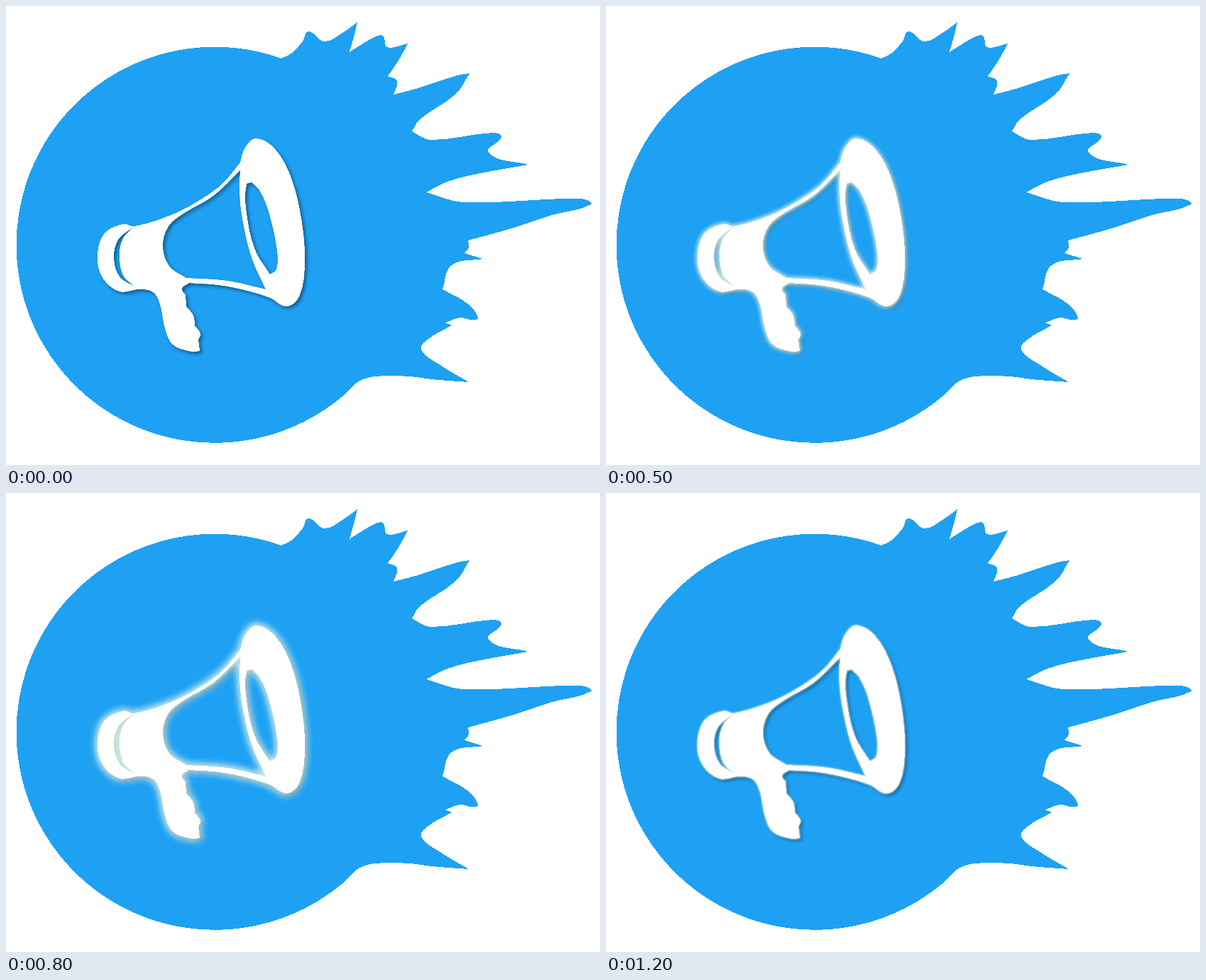
Recreate the animation shown at these times as an HTML page. Size 837 px wide and 648 px high, loop 1300 ms.

```html
<!DOCTYPE html>
<html lang="en">
<head>
<meta charset="utf-8">
<title>Megaphone</title>
<style>
  html, body { margin: 0; width: 100%; height: 100%; overflow: hidden; background: #fff; }
  svg { display: block; width: 837px; height: 648px; }
  .splat { fill: #1ea1f3; shape-rendering: crispEdges; }
  .horn { fill: #fff; shape-rendering: crispEdges; }
  .shadow { fill: #000; opacity: .42; filter: blur(2.5px); }
  .glow {
    fill: #ffffe8; stroke: #ffffe8; stroke-linejoin: round; opacity: .76;
    animation: glow 1300ms infinite;
  }
  /* Rises in eight even steps, then falls faster towards the end. */
  @keyframes glow {
    0%     { stroke-width: 0;   filter: blur(0);   animation-timing-function: steps(8); }
    61.53% { stroke-width: 8px; filter: blur(4px); animation-timing-function: steps(2); }
    76.92% { stroke-width: 6px; filter: blur(3px); animation-timing-function: steps(2); }
    92.3%  { stroke-width: 2px; filter: blur(1px); animation-timing-function: step-end; }
    100%   { stroke-width: 0;   filter: blur(0); }
  }
</style>
</head>
<body>
<svg viewBox="0 0 837 648">
  <defs><path id="horn" fill-rule="evenodd"/></defs>
  <path id="splat" class="splat"/>
  <use class="shadow" href="#horn" x="3" y="3"/>
  <use class="glow" href="#horn"/>
  <use class="horn" href="#horn"/>
</svg>
<script>
  // Smooth curve through "x,y" points; a trailing * marks a sharp corner.
  function curve(text) {
    const pts = text.trim().split(/\s+/).map(s => {
      const [x, y] = s.replace('*', '').split(',').map(Number);
      return { x, y, sharp: s.endsWith('*') };
    });
    const last = pts.length - 1;
    // Control point of pts[i] on the side of pts[j].
    const handle = (i, j) => {
      const p = pts[i], q = pts[j];
      const back = p.sharp || i === 0 || i === last ? p : pts[2 * i - j];
      const dx = q.x - back.x, dy = q.y - back.y;
      const k = Math.hypot(q.x - p.x, q.y - p.y) * 0.35 / Math.hypot(dx, dy);
      return (p.x + dx * k).toFixed(1) + ' ' + (p.y + dy * k).toFixed(1);
    };
    let d = `M${pts[0].x} ${pts[0].y}`;
    for (let i = 0; i < last; i++) {
      d += `C${handle(i, i + 1)} ${handle(i + 1, i)} ${pts[i + 1].x} ${pts[i + 1].y}`;
    }
    return d;
  }

  const draw = (id, d) => document.getElementById(id).setAttribute('d', d);

  const spikes = curve(`388,74 402,67 418,50 426,36 449,50 477,36 495,23*
    490,44 484,65* 517,45 531,42 537,58 566,53* 553,77 538,99* 551,106 546,125*
    577,117 636,98 653,95* 634,124 583,160 572,177* 598,189 686,179 698,185
    680,207 736,224* 664,237 622,248 592,263* 644,277 810,272 824,280 770,295
    712,314 651,331* 652,341 646,349* 672,357* 628,366 615,400* 650,420 665,440
    656,443 640,440 619,447* 628,451* 595,470 585,485 612,507 652,531* 599,527
    570,523 520,523 497,530 480,546`);
  draw('splat', spikes + 'A279.5 279.5 0 1 1 388 74Z');

  const body = curve(`330,221 337,200 353,187 380,203 402,243 416,300 421,360
    414,408 396,424 372,412 340,402 300,394 258,391* 248,399 253,408* 254,424*
    264,437 266,451* 274,463 271,471* 273,487* 262,488 235,478 224,455 217,421
    207,404 188,400 160,403 137,385 129,356 138,322 165,308 181,311 233,295
    275,273 306,250 330,221`);

  const slot = curve(`178,313 158,330 152,355 160,382 181,396* 165,380
    160,350 165,328 178,313`);

  const cone = curve(`330,232 292,268 250,293 229,311 221,339 230,367 254,384*
    312,388 366,400* 346,355 333,300 329,262 330,232`);

  const mouth = curve(`346,249 339,252 338,285 350,342 372,379* 381,372
    382,345 370,290 357,260 346,249`);

  draw('horn', [body, slot, cone, mouth].join('Z') + 'Z');
</script>
</body>
</html>
```
